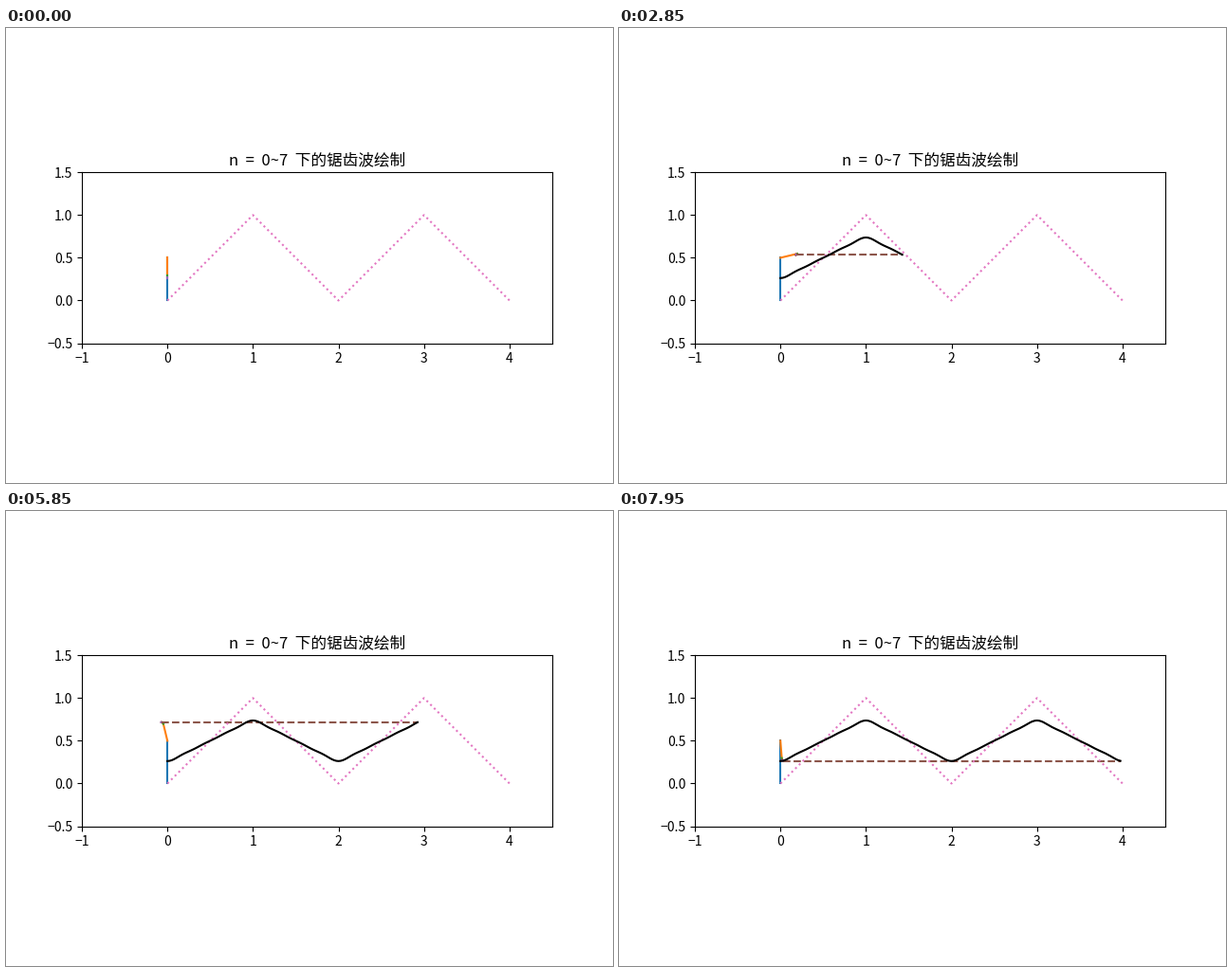
A matplotlib script that plays this animation: 640 by 480 pixels, repeating every 8 s.

```python
import matplotlib.pyplot as plt
import numpy as np
from matplotlib.animation import FuncAnimation

FRAMES = 160
STEP = 0.025
ORDERS = np.array([1, 3, 5, 7])
RADII = 2 / (np.pi * ORDERS) ** 2

plt.rcParams["font.family"] = "Noto Sans CJK JP"


def joints(t):
    """Arm joints as complex numbers, from the base to the tip."""
    spokes = -1j * RADII * np.exp(-1j * np.pi * ORDERS * t)
    return np.cumsum(np.concatenate(([0, 0.5j], spokes)))


times = np.arange(FRAMES) * STEP
wave = np.array([joints(t)[-1].imag for t in times])

fig, ax = plt.subplots(figsize=(6.4, 4.8), dpi=100)
ax.set_aspect("equal")
ax.set_xlim(-1, 4.5)
ax.set_ylim(-0.5, 1.5)
ax.set_xticks(range(-1, 5))
ax.set_yticks(np.arange(-0.5, 1.6, 0.5))
ax.set_title("n  =  0~7  下的锯齿波绘制")

arms = [ax.plot([], [], color=f"C{i}")[0] for i in range(len(ORDERS) + 1)]
link, = ax.plot([], [], "--", color="C5")
ax.plot(range(5), [0, 1, 0, 1, 0], ":", color="C6")
trace, = ax.plot([], [], "k-")


def update(i):
    z = joints(times[i])
    for arm, a, b in zip(arms, z, z[1:]):
        arm.set_data([a.real, b.real], [a.imag, b.imag])
    tip = z[-1]
    link.set_data([tip.real, times[i]], [tip.imag, tip.imag])
    trace.set_data(times[:i + 1], wave[:i + 1])
    return [*arms, link, trace]


anim = FuncAnimation(fig, update, frames=FRAMES, interval=50,
                     repeat=True, repeat_delay=0)
plt.show()
```
